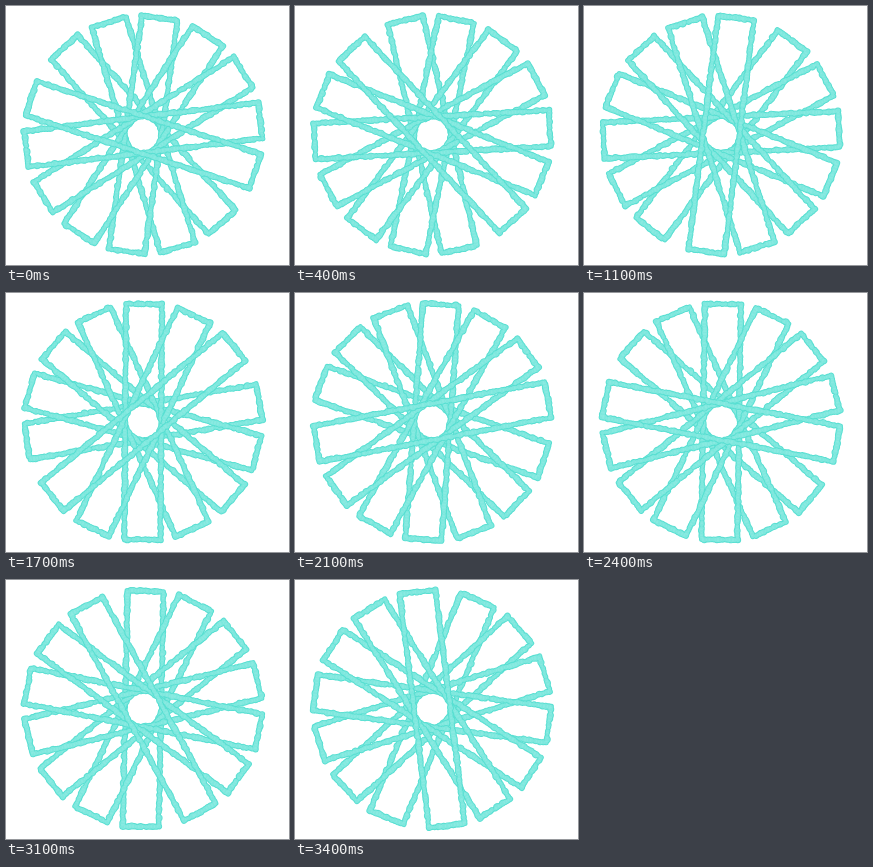
These frames come from a looping animation (283 by 259 pixels, 3500 ms). An HTML page:

```html
<!DOCTYPE html>
<html lang="en">
<head>
<meta charset="utf-8">
<title>Turning rosette</title>
<style>
  html, body { margin: 0; width: 100%; height: 100%; overflow: hidden; background: #fff; }
  svg { display: block; width: 283px; height: 259px; }
  .rim { fill: #58dfd2; }
  .core { fill: #8eebe3; fill-opacity: 0.7; }
</style>
</head>
<body>
<svg viewBox="0 0 283 259"><g id="rosette"></g></svg>
<script>
const LOOP = 3500, STEP = 100, TURN = 7.2;
const CENTER = { x: 137.2, y: 128.8 };
const HALF_WIDTH = 18, HALF_LENGTH = 117.8;
const BARS = 7, BAR_ANGLE = 25, FIRST_ANGLE = -42;
const DOT = 3.1, RIM = 0.9, SPACING = 2.9;

const rosette = document.getElementById('rosette');

let seed = 7;
function jitter(amount) {
  seed = (seed * 16807) % 2147483647;
  return (seed / 2147483647 - 0.5) * 2 * amount;
}

function addNode(parent, name, attributes) {
  const node = document.createElementNS('http://www.w3.org/2000/svg', name);
  for (const key in attributes) node.setAttribute(key, attributes[key]);
  return parent.appendChild(node);
}

function addSide(rims, cores, [x1, y1], [x2, y2]) {
  const count = Math.round(Math.hypot(x2 - x1, y2 - y1) / SPACING);
  for (let i = 0; i < count; i++) {
    const p = i / count;
    const cx = (x1 + (x2 - x1) * p + jitter(0.5)).toFixed(2);
    const cy = (y1 + (y2 - y1) * p + jitter(0.5)).toFixed(2);
    const r = DOT + jitter(0.5);
    addNode(rims, 'circle', { cx, cy, r });
    addNode(cores, 'circle', { cx, cy, r: r - RIM });
  }
}

function addBar(angle) {
  const bar = addNode(rosette, 'g', { transform: `rotate(${angle})` });
  const rims = addNode(bar, 'g', { class: 'rim' });
  const cores = addNode(bar, 'g', { class: 'core' });
  const w = HALF_WIDTH, h = HALF_LENGTH;
  const corners = [[-w, -h], [w, -h], [w, h], [-w, h]];
  corners.forEach((corner, i) => addSide(rims, cores, corner, corners[(i + 1) % 4]));
}

for (let i = 0; i < BARS; i++) addBar(FIRST_ANGLE + BAR_ANGLE * i);

function draw(time) {
  const step = Math.floor((time % LOOP) / STEP);
  rosette.setAttribute('transform',
    `translate(${CENTER.x} ${CENTER.y}) rotate(${step * TURN})`);
}

const start = performance.now();
function tick() {
  draw(performance.now() - start);
  requestAnimationFrame(tick);
}
draw(0);
requestAnimationFrame(tick);
</script>
</body>
</html>
```
